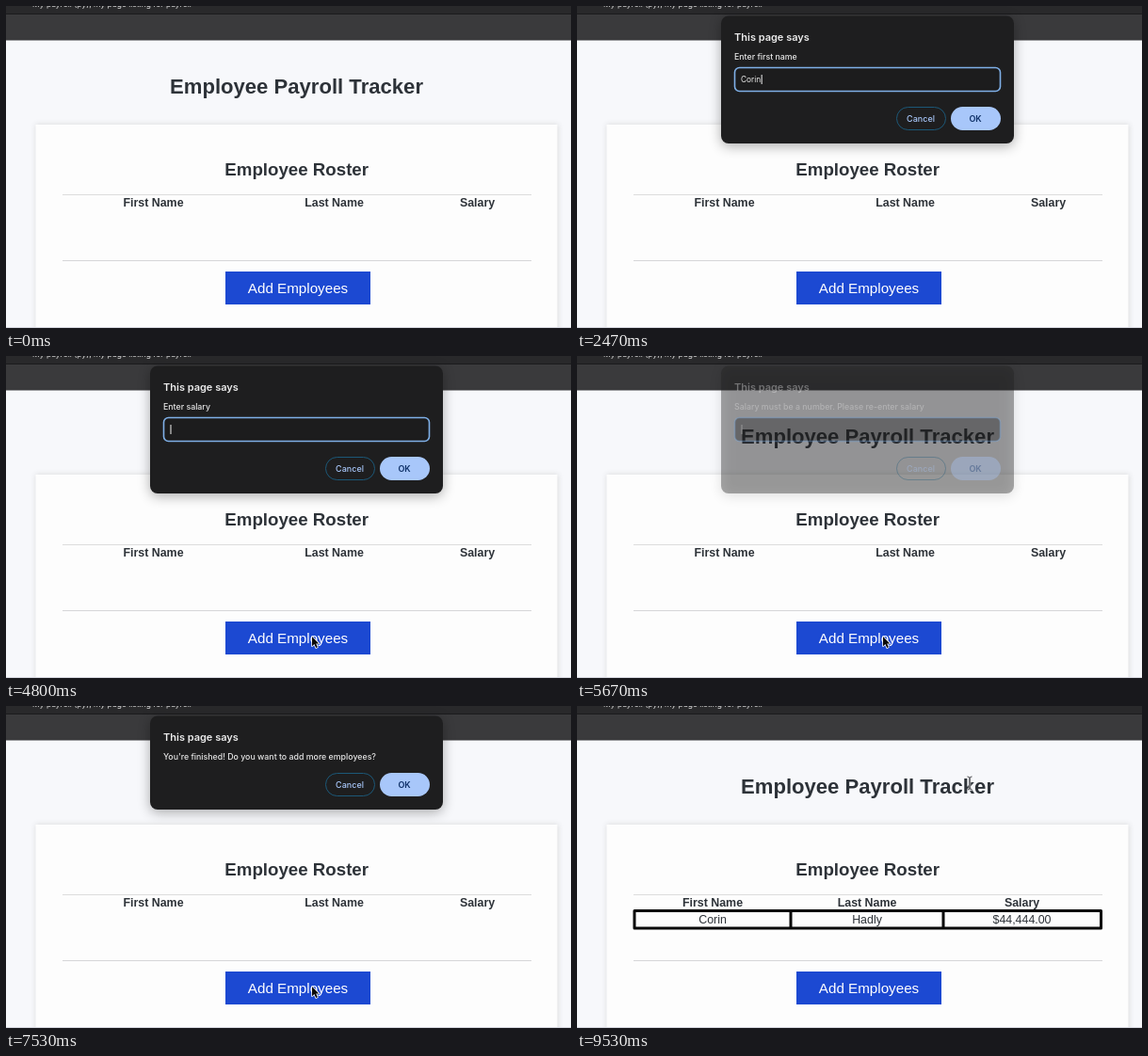
Animation of 600 by 342 pixels, one loop 9.59 s. Source, as an HTML page with a canvas:

```html
<!DOCTYPE html>
<html lang="en">
<head>
<meta charset="utf-8">
<title>Employee Payroll Tracker</title>
<style>
  html, body { margin: 0; width: 100%; height: 100%; overflow: hidden; background: #f7f8fb; }
  canvas { display: block; width: 600px; height: 342px; }
</style>
</head>
<body>
<canvas id="stage"></canvas>
<script>
const W = 600, H = 342, LOOP = 9590;
const canvas = document.getElementById('stage');
const ctx = canvas.getContext('2d');
const dpr = window.devicePixelRatio || 1;
canvas.width = W * dpr;
canvas.height = H * dpr;

const SANS = '"Liberation Sans", Arial, sans-serif';
const UI = 'Inter, Roboto, sans-serif';
const INK = '#2d3238';
const PERSON = { first: 'Corin', last: 'Hadly', salary: '$44,444.00' };
const TABLE_AT = 8930;

// Prompts in order: open and close times, message, typed text and its time span.
const DIALOGS = [
  { open: 900, close: 2870, msg: 'Enter first name', text: PERSON.first, from: 1930, to: 2400 },
  { open: 3030, close: 4270, msg: 'Enter last name', text: PERSON.last, from: 3330, to: 3800 },
  { open: 4470, close: 5470, msg: 'Enter salary', text: '', from: 0, to: 1 },
  { open: 5630, close: 7130, msg: 'Salary must be a number. Please re-enter salary',
    text: '44444', from: 6400, to: 7070 },
  { open: 7270, close: 8800, msg: "You're finished! Do you want to add more employees?", confirm: true }
];

// Pointer stops: time, x, y.
const PATH = [
  [270, 470, 60], [730, 325, 298],
  [7930, 325, 298], [8600, 365, 82],
  [8930, 365, 82], [9400, 417, 82]
];

const clamp = v => Math.max(0, Math.min(1, v));
const ease = v => v * v * (3 - 2 * v);

function text(str, x, y, font, color, align = 'left') {
  ctx.font = font;
  ctx.fillStyle = color;
  ctx.textAlign = align;
  ctx.fillText(str, x, y);
}

function rect(x, y, w, h, color) {
  ctx.fillStyle = color;
  ctx.fillRect(x, y, w, h);
}

function pill(x, y, w, h, r, fill, stroke, line = 1) {
  ctx.beginPath();
  ctx.roundRect(x, y, w, h, r);
  if (fill) { ctx.fillStyle = fill; ctx.fill(); }
  if (stroke) { ctx.strokeStyle = stroke; ctx.lineWidth = line; ctx.stroke(); }
}

function shadow(color, blur, dy = 0) {
  ctx.shadowColor = color;
  ctx.shadowBlur = blur * dpr;
  ctx.shadowOffsetY = dy * dpr;
}

function drawTable(filled) {
  const centers = filled ? [144, 308, 472.5] : [156.5, 348.5, 500.5];
  ['First Name', 'Last Name', 'Salary'].forEach((label, i) =>
    text(label, centers[i], 213, 'bold 12.4px ' + SANS, INK, 'center'));
  if (!filled) return;
  ctx.strokeStyle = '#060606';
  ctx.lineWidth = 3;
  ctx.strokeRect(61, 217.5, 495.5, 18.5);
  rect(225.5, 216, 3, 21, '#060606');
  rect(387.5, 216, 3, 21, '#060606');
  [PERSON.first, PERSON.last, PERSON.salary].forEach((cell, i) =>
    text(cell, centers[i], 231, '12.4px ' + SANS, INK, 'center'));
}

function drawPage(t) {
  rect(0, 0, W, H, '#f7f8fb');
  rect(0, 0, W, 36.5, '#3a3a3c');
  rect(0, 0, W, 8, '#29292b');
  rect(0, 8, W, 1, '#1b1b1d');
  text('My payroll (py), my page listing for payroll', 28, 0.5, '8.5px ' + UI, '#e2e2e2');

  ctx.save();
  shadow('rgba(60, 60, 50, 0.17)', 6);
  rect(31.5, 126, 554, 260, '#fdfdfd');
  ctx.restore();

  text('Employee Payroll Tracker', 308.5, 92.5, 'bold 22.1px ' + SANS, INK, 'center');
  text('Employee Roster', 308.7, 180, 'bold 18.7px ' + SANS, INK, 'center');
  rect(60, 200, 498, 1, '#dcdcdc');
  rect(60, 270, 498, 1, '#d6d6d8');
  drawTable(t >= TABLE_AT);

  rect(233, 282, 154, 35, '#1c49d2');
  text('Add Employees', 310, 305, '15.2px ' + SANS, '#ffffff', 'center');
  rect(0, 341, W, 1, '#d4d5de');
}

function drawField(d, t) {
  pill(167.5, 65.5, 282, 25, 5, '#1c1c1d', '#7fb0e8', 1.6);
  const count = Math.ceil(clamp((t - d.from) / (d.to - d.from)) * d.text.length);
  const typed = d.text.slice(0, count);
  text(typed, 174, 81, '8.3px ' + UI, '#ececec');
  rect(174.5 + ctx.measureText(typed).width, 73, 1, 10, '#f0f0f0');
}

function drawDialog(d, t) {
  const alpha = Math.min(clamp((t - d.open) / 110), 1 - clamp((t - d.close) / 110));
  if (alpha <= 0) return;
  const h = d.confirm ? 99.5 : 135.5;
  const y = d.confirm ? 71.5 : 107.5;
  ctx.save();
  ctx.globalAlpha = alpha;
  ctx.save();
  shadow('rgba(0, 0, 0, 0.32)', 13, 3);
  pill(153, 10.5, 311, h, 8, '#1e1e1f');
  ctx.restore();
  text('This page says', 167, 37, '600 11px ' + UI, '#ececec');
  text(d.msg, 167, 56.5, '500 8.8px ' + UI, '#e6e6e6');
  if (!d.confirm) drawField(d, t);
  pill(339.5, y, 52, 24, 12, null, '#1c5878');
  text('Cancel', 365, y + 15.5, '500 9px ' + UI, '#a8c7fa', 'center');
  pill(397, y - 0.5, 53, 25, 12.5, '#a8c7fa');
  text('OK', 423, y + 15.5, '600 9px ' + UI, '#0d2f66', 'center');
  ctx.restore();
}

function pointerAt(t) {
  let i = PATH.length - 1;
  while (i > 0 && PATH[i][0] > t) i--;
  const a = PATH[i], b = PATH[i + 1] || a;
  const k = a === b ? 0 : ease(clamp((t - a[0]) / (b[0] - a[0])));
  return [a[1] + (b[1] - a[1]) * k, a[2] + (b[2] - a[2]) * k];
}

function drawArrow(x, y) {
  const pts = [[0, 0], [0, 10.2], [2.4, 8], [4.2, 12.1], [5.9, 11.3], [4.2, 7.4], [7.3, 7.4]];
  ctx.beginPath();
  pts.forEach(([px, py]) => ctx.lineTo(x + px, y + py));
  ctx.closePath();
  ctx.lineJoin = 'round';
  ctx.strokeStyle = '#ffffff';
  ctx.lineWidth = 1.5;
  ctx.stroke();
  ctx.fillStyle = '#0a0a0a';
  ctx.fill();
}

function drawBeam(x, y) {
  ctx.beginPath();
  for (const side of [-1, 1]) {
    ctx.moveTo(x + side * 2.5, y - 7);
    ctx.quadraticCurveTo(x, y - 7, x, y - 5);
    ctx.lineTo(x, y + 5);
    ctx.quadraticCurveTo(x, y + 7, x + side * 2.5, y + 7);
  }
  ctx.strokeStyle = '#f4f4f6';
  ctx.lineWidth = 2.4;
  ctx.stroke();
  ctx.strokeStyle = '#4a4c50';
  ctx.lineWidth = 1;
  ctx.stroke();
}

function drawPointer(t) {
  const hidden = t < 270 || (t >= 1930 && t < 2930);
  if (hidden) return;
  const [x, y] = pointerAt(t);
  if (t >= 8900) drawBeam(x, y);
  else drawArrow(x, y);
}

function draw(t) {
  ctx.setTransform(dpr, 0, 0, dpr, 0, 0);
  drawPage(t);
  DIALOGS.forEach(d => drawDialog(d, t));
  drawPointer(t);
}

const start = performance.now();
function tick() {
  draw((performance.now() - start) % LOOP);
  requestAnimationFrame(tick);
}
tick();
</script>
</body>
</html>
```
